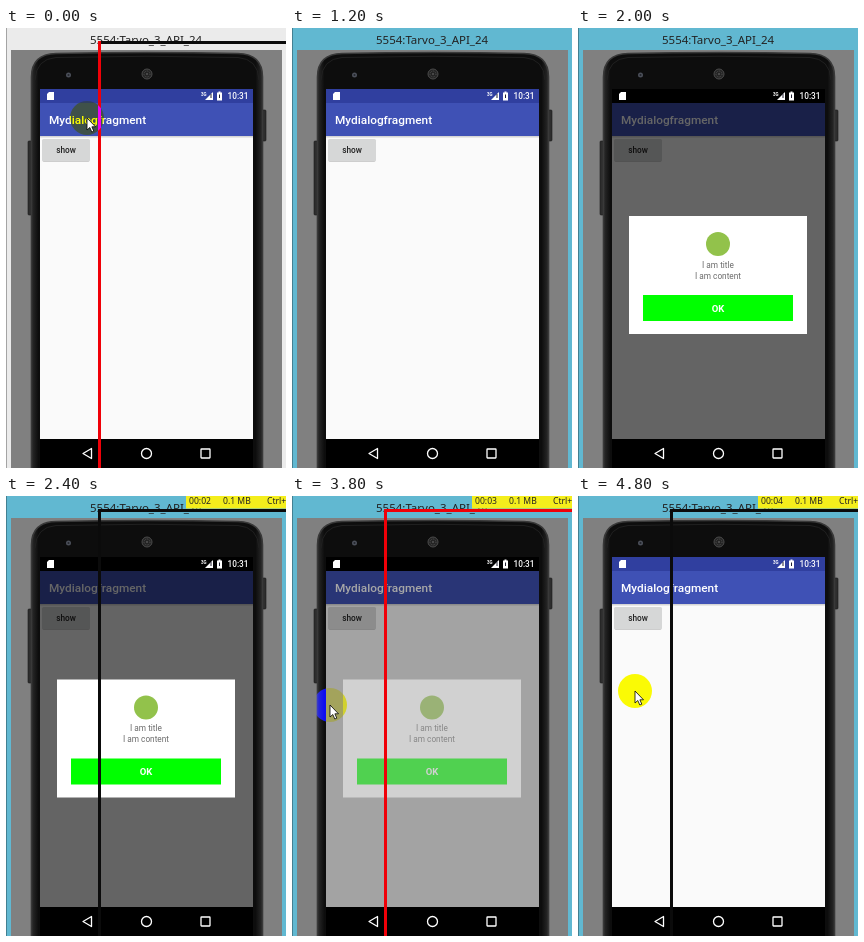
An HTML page for the animation above (5000 ms loop, 280 by 440 pixels).

```html
<!DOCTYPE html>
<html lang="en">
<head>
<meta charset="utf-8">
<title>Dialog demo</title>
<style>
  html, body { margin: 0; width: 100%; height: 100%; overflow: hidden; background: #808080; }
  svg { display: block; width: 280px; height: 440px; font-family: Roboto, sans-serif; }
  .desktop { font-family: "Noto Sans", "Open Sans", sans-serif; }
  .medium { font-weight: 500; }
  .spot { mix-blend-mode: difference; }
</style>
</head>
<body>
<svg viewBox="0 0 280 440">
  <defs>
    <linearGradient id="rim" x1="0" x2="1">
      <stop offset="0" stop-color="#2b2b2b"/>
      <stop offset=".03" stop-color="#0d0d0d"/>
      <stop offset=".97" stop-color="#0d0d0d"/>
      <stop offset="1" stop-color="#2b2b2b"/>
    </linearGradient>
  </defs>

  <!-- emulator window -->
  <rect id="chrome" width="280" height="440"/>
  <rect width="1" height="440" fill="#000" opacity=".3"/>
  <rect x="5" y="22" width="271" height="418" fill="#808080"/>
  <text class="desktop" x="84" y="16" font-size="11.5" fill="#222">5554:Tarvo_3_API_24</text>

  <!-- phone -->
  <g fill="#2e2e2e" stroke="#1a1a1a" stroke-width=".6">
    <rect x="22" y="113" width="4" height="74" rx="1"/>
    <rect x="256" y="82" width="4" height="31" rx="1"/>
  </g>
  <path d="M25.5 441V49Q25.5 26 50 25.5Q141 23.5 232 25.5Q256.500 26 256.500 49V441Z"
        fill="url(#rim)" stroke="#393939" stroke-width="1.6"/>
  <path d="M29 52Q30 31 50 29.500Q141 27 232 29.500Q252 31 253 52" fill="none" stroke="#202020"/>
  <circle cx="62.500" cy="47" r="2.500" fill="#4b4f59"/>
  <circle cx="62.500" cy="47" r="1" fill="#22252c"/>
  <circle cx="141" cy="46" r="5" fill="#242424" stroke="#4c4c4c"/>
  <circle cx="141" cy="46" r="3" fill="none" stroke="#555" stroke-dasharray="1 1"/>
  <circle cx="141" cy="46" r="1" fill="#555"/>
  <rect x="34" y="411" width="213" height="29" fill="#000"/>

  <!-- app -->
  <rect x="34" y="75" width="213" height="336" fill="#fafafa"/>
  <rect x="34" y="75" width="213" height="33" fill="#3f51b5"/>
  <rect x="34" y="108" width="213" height="1.500" fill="#000" opacity=".15"/>
  <text class="medium" x="43" y="96" font-size="11.830" fill="#fff">Mydialogfragment</text>
  <rect x="36.500" y="112" width="47" height="22" rx="1.500" fill="#000" opacity=".18"/>
  <rect id="button" x="36" y="111" width="48" height="22" rx="1.500"/>
  <text class="medium" x="60" y="125" font-size="8.280" text-anchor="middle" fill="#222">show</text>
  <rect id="scrim" x="34" y="75" width="213" height="336"/>

  <!-- system bars -->
  <rect id="status" x="34" y="61" width="213" height="14"/>
  <g fill="#fff">
    <path d="M43 64H48V72H41V66Z"/>
    <path d="M207 64V72H199Z"/>
    <text x="195" y="68" font-size="4.500" font-weight="700">3G</text>
    <path d="M212.500 63.500H214.500V64.500H216V72.500H211V64.500H212.500Z"/>
    <text class="medium" x="242.500" y="71" font-size="8.280" text-anchor="end">10:31</text>
  </g>
  <path d="M205 66V70M213.500 66.500V70" stroke="#223" stroke-width="1"/>
  <g fill="none" stroke="#fff" stroke-width="1.300" stroke-linejoin="round">
    <path d="M77 425.500L85.500 420.500V430.500Z"/>
    <circle cx="140.500" cy="425.500" r="5"/>
    <rect x="195" y="421" width="9" height="9" rx=".5"/>
  </g>

  <!-- dialog, placed by its top edge -->
  <g id="dialog" text-anchor="middle">
    <rect x="51" width="178" height="118" fill="#fff"/>
    <circle cx="140" cy="28" r="12" fill="#92c24b"/>
    <g font-size="8.280" fill="#6c6c6c">
      <text x="140" y="51.500">I am title</text>
      <text x="140" y="62.500">I am content</text>
    </g>
    <rect x="65" y="79" width="150" height="26" fill="#0f0"/>
    <text x="140" y="95.500" font-size="9.500" font-weight="700" fill="#fff">OK</text>
  </g>

  <!-- recorder overlay -->
  <g id="frame">
    <rect id="frameTop" x="92" y="13" width="188" height="3"/>
    <rect id="frameSide" x="92" y="13" width="3" height="427"/>
  </g>
  <g id="info" class="desktop" font-size="8.600" fill="#222">
    <rect x="180" width="100" height="12.500" fill="#f4ee1c"/>
    <text id="clock" x="183" y="8"></text>
    <text id="size" x="217" y="8"></text>
    <text x="261" y="8">Ctrl+F</text>
  </g>
  <circle id="spot" class="spot" r="17" fill="#00f"/>
  <path id="arrow" d="M0 0V12L2.800 9.500L4.800 14L6.800 13.200L4.900 8.800H8.500Z"
        fill="#fff" stroke="#000" stroke-width=".8"/>
</svg>
<script>
const LOOP = 5000, STEP = 200;
const RED = '#f00008', BLACK = '#0b0b0b';
const $ = id => document.getElementById(id);
const set = (id, attrs) => {
  for (const name in attrs) $(id).setAttribute(name, attrs[name]);
};
const show = (id, visible) => set(id, { display: visible ? 'inline' : 'none' });

// Each track lists [start time, value]; a value holds until the next entry.
const tracks = {
  chrome: [[0, '#ebebeb'], [1200, '#61b8d1']],
  button: [[0, '#d6d7d7'], [1400, '#b9baba'], [1600, '#cbcccc'], [1800, '#d6d7d7']],
  status: [[0, '#303f9f'], [1600, '#000'], [4000, '#303f9f']],
  scrim: [[0, 0], [1800, .43], [2000, .6], [3800, .35], [4000, 0]],
  dialogTop: [[0, null], [1800, 193.5], [2000, 188], [2400, 183.5], [4000, null]],
  dialogFade: [[0, 1], [3800, .5]],
  frameSide: [[0, RED], [200, BLACK], [1200, null], [2200, BLACK], [3200, RED], [4200, BLACK]],
  clock: [[0, null], [2200, '00:01'], [2400, '00:02'], [3200, '00:03'], [4400, '00:04']],
  size: [[0, '0.0 MB'], [2400, '0.1 MB']],
  pointer: [
    [0, [81, 90]], [200, [81, 95]], [400, [80, 84]], [600, null],
    [3000, [36, 197]], [3200, [37, 203]], [3400, [38, 209]],
    [4400, [41, 206]], [4600, [45, 199]], [4800, [57, 195]]
  ]
};
const at = (name, t) => tracks[name].filter(([start]) => start <= t).pop()[1];

function draw(ms) {
  const t = Math.floor((ms % LOOP) / STEP) * STEP;
  for (const id of ['chrome', 'button', 'status']) set(id, { fill: at(id, t) });
  set('scrim', { opacity: at('scrim', t) });

  const top = at('dialogTop', t);
  show('dialog', top !== null);
  if (top !== null) set('dialog', { transform: `translate(0 ${top})`, opacity: at('dialogFade', t) });

  const side = at('frameSide', t);
  show('frame', side);
  if (side) {
    set('frameSide', { fill: side });
    set('frameTop', { fill: t < STEP ? BLACK : side });
  }

  const clock = at('clock', t);
  show('info', clock);
  $('clock').textContent = clock || '';
  $('size').textContent = at('size', t);

  const pointer = at('pointer', t);
  for (const id of ['spot', 'arrow']) {
    show(id, pointer);
    if (pointer) set(id, { transform: `translate(${pointer})` });
  }
}

const begin = performance.now();
function tick() {
  draw(performance.now() - begin);
  requestAnimationFrame(tick);
}
tick();
</script>
</body>
</html>
```
